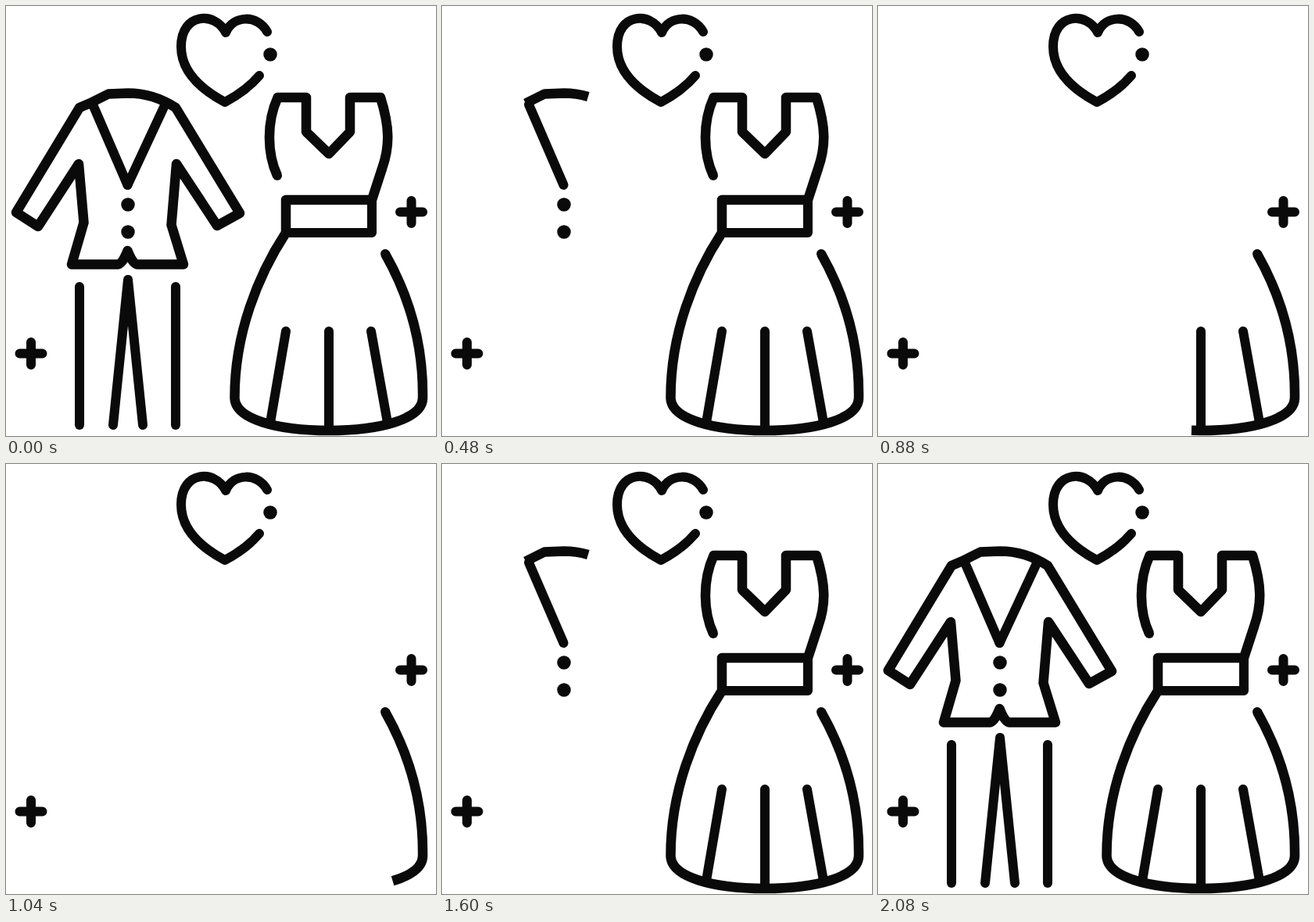
Write an HTML page that moves like this. It is 550x550 px and loops after 2160 ms.

```html
<!DOCTYPE html>
<html lang="en">
<head>
<meta charset="utf-8">
<title>Wedding outfits</title>
<style>
html, body { margin: 0; width: 100%; height: 100%; overflow: hidden; background: #fff; }
svg { display: block; width: 100%; height: 100%; }
path { fill: none; stroke: #0a0a0a; stroke-width: 12; stroke-linecap: round; stroke-linejoin: round; }
path.cut { stroke-width: 12.5; stroke-linecap: butt; }
path.dot { stroke-width: 17.5; }
</style>
</head>
<body>
<!-- data-gone: the erasing step at which a part disappears -->
<svg viewBox="0 0 550 550">
  <!-- heart and plus signs -->
  <path d="M334 33C322 11 291 11 281 34C268 7 224 8 224 52C224 85 252 108 280 123Q308 108 324 89"/>
  <path class="dot" d="M338 62h.01"/>
  <path d="M504 263.5h29M518.5 249v29M17.5 444.5h29M32 430v29"/>

  <!-- suit -->
  <path class="cut" id="suit" d="M107 124.5L94 130L13 264L41 282L93 202L99.5 277L84 330.5H143Q149 330 155.5 313Q162 330 168 330.5H227L211.500 280L218 202L270 281L299 265L217 130C200 119 180 111.500 156 111.500L131 112.500L107 124.500"/>
  <path data-gone="7" d="M111 126L155.5 229"/>
  <path data-gone="6" d="M155.5 229L203 127"/>
  <path data-gone="7" class="dot" d="M156 254h.01M156 289h.01"/>
  <path data-gone="3" d="M94 359V536"/>
  <path data-gone="4" d="M137 536L156 350L175 536"/>
  <path data-gone="5" d="M217 359V536"/>

  <!-- dress -->
  <path class="cut" id="dress" d="M347 217C334 189 333 149 347.5 117H384V161L413 189L440 161V117H479C491 155 491 180 481 208L468 248H358V290C322 345 292 420 292.500 502C294 528 345 543 413 543C480 543 532 528 533 502C534 430 515 370 485 317"/>
  <path data-gone="8" d="M347 217h.01"/>
  <path data-gone="10" d="M468 248V290H358"/>
  <path data-gone="11" d="M358 416L338 533"/>
  <path data-gone="12" d="M413 416V543M467 416L488 533"/>
  <path data-gone="13" d="M485 317h.01"/>
</svg>
<script>
const STEP = 80, FRAMES = 27, ALL = 2000;
const parts = document.querySelectorAll('[data-gone]');

// Length erased from the start of each outline, per step
const erased = {
  suit: [0, 155, 310, 461, 650, 842, 1043, ALL],
  dress: [0, 0, 0, 0, 0, 0, 0, 0, 250, 500, 735, 981, 1075, ALL]
};

// Erase to nothing, then redraw in reverse
function stepAt(n) {
  if (n < 12) return n;
  return n === 12 ? 13 : Math.min(12, 26 - n);
}

function draw(step) {
  for (const id in erased) {
    const gone = erased[id][step] ?? ALL;
    document.getElementById(id).style.strokeDasharray = `0 ${gone} ${ALL} ${ALL}`;
  }
  for (const part of parts)
    part.style.visibility = step >= part.dataset.gone ? 'hidden' : 'visible';
}

const start = performance.now();
function tick() {
  const time = performance.now() - start;
  draw(stepAt(Math.floor(time / STEP) % FRAMES));
  requestAnimationFrame(tick);
}
tick();
</script>
</body>
</html>
```
